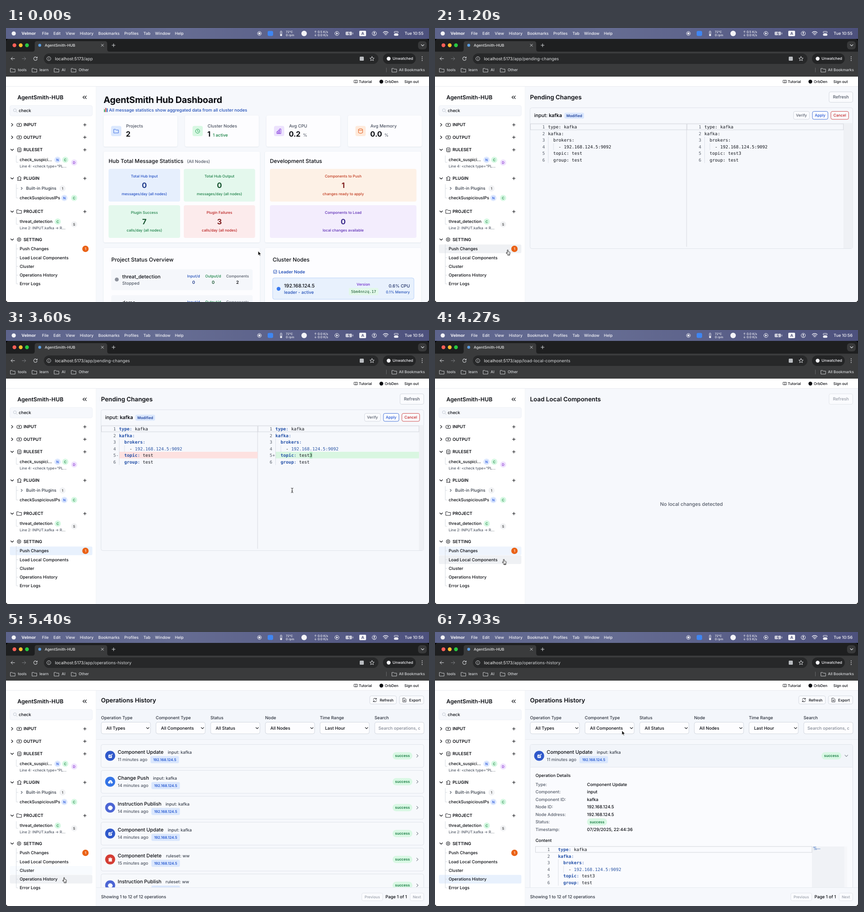
Animation of 928 by 603 pixels, one loop 8 s. Source, as an HTML page:

```html
<!DOCTYPE html>
<html lang="en">
<head>
<meta charset="utf-8">
<title>Dashboard tour</title>
<style>
html, body { margin: 0; width: 100%; height: 100%; overflow: hidden; background: #000; }
svg { display: block; width: 928px; height: 603px; }
text { font-family: Inter, sans-serif; text-rendering: geometricPrecision; white-space: pre; }
.mono { font-family: "DejaVu Sans Mono", monospace; }
.move { animation: move 8s infinite ease-in-out; }
</style>
</head>
<body>
<svg id="stage" viewBox="0 0 928 603"></svg>
<script>
const LOOP = 8000;
const INK = '#090b10', GRAY = '#535a67', BLUE = '#2350b8', EDGE = '#dfe3ea', PAGE = '#f6f8fc';
let css = '', count = 0;
const pct = ms => `${ms / LOOP * 100}%`;

// Shapes. Text is placed by the middle of its capitals.
const text = (x, y, s, size = 9.25, fill = INK, weight = 450, anchor = 'start', cls = '') =>
  `<text x="${x}" y="${y + size * .36}" font-size="${size}" fill="${fill}" font-weight="${weight}" text-anchor="${anchor}" class="${cls}">${s}</text>`;
const mid = (x, y, s, size, fill, weight = 500) => text(x, y, s, size, fill, weight, 'middle');
const box = (x, y, w, h, fill, r = 0, stroke = 'none') =>
  `<rect x="${x}" y="${y}" width="${w}" height="${h}" rx="${r}" fill="${fill}" stroke="${stroke}"/>`;
const dot = (x, y, r, fill, stroke = 'none') => `<circle cx="${x}" cy="${y}" r="${r}" fill="${fill}" stroke="${stroke}"/>`;
const line = (d, color = INK, w = 1, fill = 'none') =>
  `<path d="${d}" stroke="${color}" stroke-width="${w}" fill="${fill}" stroke-linecap="round" stroke-linejoin="round"/>`;
const folder = (x, y, c) => line(`M${x} ${y - 4}h3.5l1.3 1.5h5.2v6.500h-10z`, c, .9);
const chevron = (x, y, down, c = INK, s = 3, w = 1.1) =>
  line(down ? `M${x - s} ${y - s / 2}l${s} ${s}l${s} ${-s}` : `M${x - s / 2} ${y - s}l${s} ${s}l${-s} ${s}`, c, w);
const plus = (x, y, c = INK, s = 3) => line(`M${x - s} ${y}h${2 * s}M${x} ${y - s}v${2 * s}`, c, 1.1);
const badge = (x, y, s, bg, fg) => dot(x, y, 6.8, bg) + mid(x, y, s, 7.5, fg);
const pill = (x, y, w, s, bg, fg, size = 8, h = 15, r = 3) => box(x, y - h / 2, w, h, bg, r) + mid(x + w / 2, y, s, size, fg, 600);

// Timing.
function during(body, ...spans) {
  const name = 'show' + ++count;
  let frames = spans[0][0] > 0 ? '0%{visibility:hidden}' : '';
  for (const [a, b] of spans) frames += `${pct(a)}{visibility:visible}${pct(b)}{visibility:hidden}`;
  css += `@keyframes ${name}{${frames}}`;
  return `<g style="animation:${name} 8s step-end infinite">${body}</g>`;
}
function fade(body, ...stops) {
  const name = 'fade' + ++count;
  const frames = [[0, 0], ...stops, [LOOP, stops.at(-1)[1]]].map(([ms, o]) => `${pct(ms)}{opacity:${o}}`);
  css += `@keyframes ${name}{${frames.join('')}}`;
  return `<g style="animation:${name} 8s linear infinite">${body}</g>`;
}

const DASH = [0, 1000], PENDING = [1000, 4200], LOCAL = [4200, 4880], CLUSTER = [4880, 5270], OPS = [5270, LOOP];
const OPEN = 6750;

function browser() {
  const W = '#f4f4f8', L = '#d5d7da';
  let s = box(0, 0, 928, 24, 'url(#menu)') + box(0, 24, 928, 40, '#1e1f20', 6) + box(0, 52, 928, 55, '#3a3b3c');
  s += dot(17, 12, 4.6, W) + text(34, 11.5, 'Velmor', 9, W, 700);
  [[79, 'File'], [104, 'Edit'], [131, 'View'], [162, 'History'], [202.5, 'Bookmarks'], [259.5, 'Profiles'], [301.5, 'Tab'], [327, 'Window'], [370.5, 'Help']]
    .forEach(([x, name]) => s += text(x, 11.5, name, 8.7, W, 500));
  s += dot(556, 12, 4.2, 'none', W) + dot(556, 12, 2.3, W) + box(574, 6.5, 12, 11, '#3f86f2', 3);
  s += line('M602 13V7.500q1.500 -2 3 0V13', W) + dot(603.5, 15.5, 2.3, W);
  s += text(614, 8.5, '72°C', 6.5, W) + text(614, 16, '0 rpm', 6.5, W) + dot(654, 12, 6, W);
  s += dot(726, 12, 4.5, 'none', W) + line('M724.800 9.800l3.500 2.200l-3.500 2.200z', W, .5, W);
  s += box(745, 8, 14, 8, '#c9cad8', 2) + line('M761 10.500v3', W) + line('M753 8l-2 4.500h3l-2 4', '#454972');
  s += box(775, 6, 15, 12, W, 2) + mid(782.5, 12, 'A', 8.5, '#454972', 600);
  s += dot(808, 12, 4.7, 'none', W) + dot(808, 10.8, 1.7, W) + line('M805.500 15q2.500 -2 5 0', W);
  s += line('M827.500 10q5.500 -4.500 11 0M829.500 12.500q3.500 -2.800 7 0M831.500 14.800q1.500 -1.200 3 0', W, 1.4);
  s += box(851.5, 7.5, 9, 3.6, 'none', 1.8, W) + box(851.5, 13, 9, 3.6, W, 1.8, W);
  const net = (up, down) => text(676, 8.3, `↑ ${up} K/s`, 6.8, W) + text(676, 16, `↓ ${down} K/s`, 6.8, W);
  s += during(net('0.5', '0.0'), [0, 1800]) + during(net('0.5', '0.5'), [1800, 3600], [5700, LOOP]) + during(net('0.0', '0.0'), [3600, 5700]);
  const clock = v => text(874.5, 11.5, `Tue ${v}`, 9, W, 500);
  s += during(clock('10:55'), [0, 1800]) + during(clock('10:56'), [1800, LOOP]);

  s += dot(18.5, 38, 4.2, '#fe5f57') + dot(32.3, 38, 4.2, '#febc2e') + dot(46, 38, 4.2, '#28c840');
  s += line('M58 52q5 0 5 -5V34q0 -5 5 -5H217q5 0 5 5V47q0 5 5 5z', 'none', 0, '#3a3b3c');
  s += dot(74, 38, 3.2, '#5b9de0') + text(85, 38, 'AgentSmith-HUB', 8.2, '#e6e7e8');
  s += line('M209 35.500l5 5M214 35.500l-5 5', L) + plus(236, 38, L, 3.5) + box(904, 29, 19, 18, '#38393a', 6) + chevron(914, 38, true, L);
  s += line('M19 67.500h-8m3.500 -3.500l-3.500 3.500l3.500 3.500', L) + line('M35.500 67.500h8m-3.500 -3.500l3.500 3.500l-3.500 3.500', '#77797c');
  s += line('M67.800 65.500a3.800 3.800 0 1 0 .4 3M68.500 63.500v2.500h-2.500', L, 1.1);
  s += box(83, 56, 734, 23, '#272829', 11.5) + dot(94, 67.5, 4.3, 'none', L) + line('M94 67v2.500M94 65.200v.1', L);
  const url = path => text(107.5, 67.5, `<tspan fill="#f1f1f1">localhost:5173</tspan>/app${path}`, 9.35, '#d6d8da', 400);
  [['', DASH], ['/pending-changes', PENDING], ['/load-local-components', LOCAL], ['/cluster', CLUSTER], ['/operations-history', OPS]]
    .forEach(([path, span]) => s += during(url(path), span));
  s += box(776, 63, 9, 9, '#b9bcc0', 1.5) + line('M803 62.800l1.400 3.200l3.500 .3l-2.700 2.300l.9 3.400l-3.100 -1.900l-3.100 1.900l.9 -3.400l-2.700 -2.300l3.500 -.3z', L);
  s += box(827, 56, 72, 23, '#242526', 11.5) + dot(839.5, 67.5, 4.2, W) + text(848, 67.5, 'Unwatched', 8.3, W, 500);
  [-4, 0, 4].forEach(dy => s += dot(913, 67.5 + dy, 1, L));
  [[10, 'tools'], [57.5, 'learn'], [106, 'AI'], [143.5, 'Other']].forEach(([x, name]) => s += folder(x, 93, L) + text(x + 16, 92.5, name, 8.3, L));
  return s + line('M834.500 88v9', '#66686a') + folder(847, 93, L) + text(862, 92.5, 'All Bookmarks', 8.3, L);
}

function sidebar() {
  let s = box(0, 107, 928, 22, '#fff') + box(0, 129, 198, 474, '#fff') + line('M0 128.500H928', '#e4e6ec', .8) + line('M197.500 129V603', '#eceff4', .7);
  s += line('M767.500 115.500v5.500M764 115h3.500h3.500v5.500h-7z', INK, .8) + text(774, 118, 'Tutorial', 8.05, INK, 500);
  s += dot(823.5, 118, 4.2, INK) + text(831, 118, 'OrbDen', 8.05, INK, 500) + text(874, 118, 'Sign out', 8.05, INK, 500);
  s += text(25, 152.5, 'AgentSmith-HUB', 12.2, INK, 600) + line('M172 149.300l-3.200 3.200l3.200 3.200M176.300 149.300l-3.200 3.200l3.200 3.200', INK, 1.2);
  s += box(8.5, 170.5, 181, 23, PAGE, 4, '#eef1f6') + dot(19.5, 181, 3.2, 'none', '#c3c8d2') + line('M22 183.500l2.500 2.500', '#c3c8d2') + text(28, 182, 'check');
  const wide = y => box(24, y - 3, 10, 6.5, 'none', 1.5, INK) + dot(29, y, 1.3, INK);
  const icons = [wide, wide,
    y => box(25.5, y - 4, 7.5, 8.5, 'none', 1, INK) + line(`M27.500 ${y - .5}h3.500M27.500 ${y + 2}h3.500`, INK, .8),
    y => line(`M25.500 ${y - 2}h2q0 -2.500 2 -2.500t2 2.500h1.500v2.500q-2 0 -2 1.500t2 1v1.500h-7.500v-2q2 0 2 -1.500t-2 -1z`, INK, .9),
    y => folder(24, y, INK),
    y => dot(28.7, y, 4, 'none', INK) + dot(28.7, y, 1.6, 'none', INK)];
  [['INPUT', 213], ['OUTPUT', 240.5], ['RULESET', 268], ['PLUGIN', 331], ['PROJECT', 404], ['SETTING', 465.5]].forEach(([name, y], i) =>
    s += chevron(13.5, y, i > 1) + icons[i](y) + text(38.5, y, name, 9.35, INK, 600) + (i < 5 ? plus(173, y) : ''));

  const row = (y, color) => box(8.5, y - 9.5, 181, 19, color, 3);
  const hover = (y, a, b) => fade(row(y, '#eff1f4'), [a, 0], [a + 100, 1], [b, 1], [b + 130, 0]);
  const active = (y, a, b) => fade(row(y, '#e8f1fd'), [a, 0], [a + 100, 1], ...(b ? [[b, 1], [b + 150, 0]] : []));
  s += active(486, 1720, 4230) + hover(486, 690, 1750) + hover(505.5, 3990, 4560);
  s += active(505.5, 4560, 4890) + hover(524.5, 4560, 5060) + active(524.5, 5060, 5290) + hover(544, 5060, 5640) + active(544, 5640);

  s += line('M22.500 281V295.500h4M22.500 344V374h4M22.500 353h4M22.500 417V432h4M22.500 476V563h4' + [486, 505.5, 524.5, 544].map(y => `M22.500 ${y}h4`).join(''), '#d4d8df', .9);
  const N = (x, y) => badge(x, y, 'N', '#dae6fe', '#1d4ed8'), C = (x, y) => badge(x, y, 'C', '#d5f8e2', '#16803d');
  s += text(30, 290, 'check_suspici...') + N(113, 290) + C(130, 290) + badge(149.5, 296, 'D', '#efe2fd', '#7e22ce') + text(30, 304, 'Line 4: &lt;check type="PL...', 8.05, GRAY);
  s += chevron(34.5, 353, false, GRAY, 2.5) + text(44, 353, 'Built-in Plugins', 9.25, '#333a46') + badge(124, 353, '1', '#f1f2f4', '#333');
  s += text(30, 374, 'checkSuspiciousIPs') + N(128, 374) + C(149.5, 374);
  s += text(30, 426, 'threat_detection') + C(113.5, 426) + badge(149.5, 432, 'S', '#f1f2f4', '#333') + text(30, 440, 'Line 2: INPUT.kafka -> R...', 8.05, GRAY);
  ['Push Changes', 'Load Local Components', 'Cluster', 'Operations History', 'Error Logs'].forEach((name, i) => s += text(30, 486 + i * 19.25, name));
  return s + dot(174.3, 486, 7, '#ea6115') + mid(174.3, 486, '1', 8, '#fff');
}

function dashboard() {
  const card = (x, y, w, h) => `<g filter="url(#soft)">${box(x, y, w, h, '#fdfdff', 4)}</g>`;
  let s = text(214, 158, 'AgentSmith Hub Dashboard', 19.6, INK, 700).replace('<text', '<text letter-spacing="-.25"');
  s += box(214.5, 175.5, 9, 9.5, '#e4eaf1') + box(215, 179, 2, 6, '#38a05a') + box(218, 176, 2, 9, '#d84b4b') + box(221, 177, 2, 8, '#3b76d0') + text(226, 180.5, 'All message statistics show aggregated data from all cluster nodes', 9.5, BLUE);
  const stats = [['Projects', '2', '', '#dbe8fe', '#2f62e0', 9], ['Cluster Nodes', '1', '1 active', '#d8f8e3', '#1fa052', 12], ['Avg CPU', '0.2', '%', '#ece2fd', '#8439dc', 31], ['Avg Memory', '0.0', '%', '#feeadb', '#e2591a', 31]];
  const glyph = [(x, c) => folder(x - 5, 227, c), (x, c) => dot(x, 227, 4.5, 'none', c) + line(`M${x} 224.500v2.800l1.800 .8`, c),
    (x, c) => line(`M${x - 5} 232v-4h3v4zM${x - 2} 232v-7h3v7zM${x + 1} 232v-10h3v10z`, c),
    (x, c) => `<ellipse cx="${x}" cy="223.500" rx="4.500" ry="1.800" fill="none" stroke="${c}"/>` + line(`M${x - 4.5} 223.500v7q4.500 3 9 0v-7`, c)];
  stats.forEach(([name, value, unit, bg, fg, dx], i) => {
    const x = 214 + 178.7 * i;
    s += card(x, 192.5, 162, 68.5) + box(x + 16.5, 215.5, 22.5, 22.5, bg, 4) + glyph[i](x + 27.7, fg);
    s += text(x + 49.5, 216, name, 9.5, '#4a5160', 500) + text(x + 49, 233.5, value, 16, INK, 700) + text(x + 49 + dx, 236, unit, 9.3, i === 1 ? '#168043' : GRAY);
  });
  s += card(214, 272, 343, 200) + card(568, 272, 343, 200) + card(214, 484, 343, 150) + card(568, 484, 343, 150);
  s += text(225, 293, 'Hub Total Message Statistics', 11.85, INK, 500) + text(397, 293.5, '(All Nodes)', 9.5, GRAY) + text(579, 293, 'Development Status', 11.9, INK, 500);
  const tile = (x, y, w, bg, fg, dark, a, n, b) => box(x, y, w, 72, bg, 4) + mid(x + w / 2, y + 16.5, a, 8.1, fg) + mid(x + w / 2, y + 36, n, 16.3, dark, 700) + mid(x + w / 2, y + 55, b, 8.1, fg);
  s += tile(225, 310, 157, '#e6effd', '#2450c4', '#1e3a8a', 'Total Hub Input', 0, 'messages/day (all nodes)');
  s += tile(390, 310, 156.5, '#e4f8ed', '#1d8048', '#14532d', 'Total Hub Output', 0, 'messages/day (all nodes)');
  s += tile(225, 390, 157, '#e4f8ed', '#1d8048', '#14532d', 'Plugin Success', 7, 'calls/day (all nodes)');
  s += tile(390, 390, 156.5, '#fcebec', '#b91f1f', '#7f1d1d', 'Plugin Failures', 3, 'calls/day (all nodes)');
  s += tile(579, 310, 321.5, '#fdf1e6', '#c0391d', '#7f1d1d', 'Components to Push', 1, 'changes ready to apply');
  s += tile(579, 390, 321.5, '#f3edfd', '#5b2bb4', '#3b2a8a', 'Components to Load', 0, 'local changes available');
  s += text(231, 510, 'Project Status Overview', 11.9, INK, 500) + text(585, 510, 'Cluster Nodes', 11.9, INK, 500);
  const project = (y, name, note) => box(231, y, 310, 46, '#f5f7fb', 4) + dot(243, y + 22.5, 4.3, '#8d929c') + text(255, y + 16, name, 10.8, INK, 500) + text(255, y + 31, note, 9.4, GRAY) +
    mid(411.5, y + 15.5, 'Input/d', 8.2, BLUE) + mid(411.5, y + 28.5, 0, 9.4, '#1e3a8a', 600) + mid(454.5, y + 15.5, 'Output/d', 8.2, '#168043') + mid(454.5, y + 28.5, 0, 9.4, '#14532d', 600) +
    mid(508, y + 15.5, 'Components', 8.2, GRAY, 450) + mid(508, y + 28.5, 2, 9.4, INK, 600);
  s += project(531, 'threat_detection', 'Stopped') + project(588, 'demo', 'Stopped');
  s += box(587, 533, 7, 7, 'none', 1, BLUE) + line('M588.500 536.500l1.500 1.500l3 -3', BLUE) + text(598, 537, 'Leader Node', 9.4, BLUE, 600);
  s += box(585, 550, 310, 47, '#e8f1fd', 4, '#b9d2f9') + dot(598, 574, 4.2, '#3a7bf0') + text(610, 567, '192.168.124.5', 10.7, INK, 500) + text(610, 582, 'leader - active', 9.5, BLUE);
  s += mid(784, 564, 'Version', 8.1, '#6d28c9') + box(752, 572, 65, 16, '#e2f8ea', 3) + text(784.5, 580.5, '5bm4nnzq.17', 8.3, '#14532d', 400, 'middle', 'mono');
  return s + text(886, 568, '0.6% CPU', 9.5, '#1e2f66', 500, 'end') + text(886, 581, '0.1% Memory', 8.1, BLUE, 450, 'end');
}

const LINE = 14.5;
function code(x, y, topic, colored, gap, marked = '') {
  const rows = [[0, 'type', ' kafka'], [0, 'kafka', ''], [2, 'brokers', ''], [4, '', '- 192.168.124.5:9092'], [2, 'topic', ' ' + topic], [2, 'group', ' test']];
  const key = k => k && (colored ? `<tspan fill="#2350a8" font-weight="700">${k}</tspan><tspan fill="#2350a8">:</tspan>` : k + ':');
  const value = v => colored ? v.replace(/192.*/, '<tspan fill="#2a55a5">$&</tspan>') : v;
  return line(`M${x + .5} ${y + 22}v57M${x + 12} ${y + 36.500}v14`, '#d6dae1', .8) + rows.map(([indent, k, v], i) =>
    text(x - gap, y + i * LINE, i + 1, 9.3, '#59606c', 400, 'end', 'mono') + (marked && i === 4 ? text(x - 6.5, y + i * LINE, marked, 9.3, '#59606c', 400, 'start', 'mono') : '') +
    text(x + indent * 5.78, y + i * LINE, key(k) + value(v), 9.6, '#15181f', 400, 'start', 'mono')).join('');
}

const title = (s, y = 152) => text(208.5, y, s, 13.3, INK, 600);
const button = (x, y, w, h, s, size, fg, edge = '#d5d9e0') => box(x + .5, y + .5, w - 1, h - 1, '#fafbfe', 3.5, edge) + mid(x + w / 2, y + h / 2, s, size, fg);

function pending() {
  const frame = (right, colored) => box(right, 210, 916.5 - right, 275, '#eff1f5') +
    (colored ? box(248, 268, 304, 14.5, '#fde1e0') + box(591, 268, right - 591, 14.5, '#d9f6e1') + box(666, 268, 6, 14.5, '#b4ebc3') : '') +
    box(209.5, 211, 342.5, 13, 'none', 0, '#d3d6dc') + box(553, 211, right - 553, 13, 'none', 0, '#d3d6dc') +
    code(248, 217.7, 'test', colored, 7, colored && '-') + code(591, 217.7, 'test3', colored, 7, colored && '+');
  let s = title('Pending Changes') + button(864, 140, 53, 24, 'Refresh', 9.5, '#555c69');
  s += box(208.5, 175.5, 708, 310, PAGE, 4, EDGE) + line('M209 209.500H916', '#eceff4', .7) + line('M552 224V481', '#d6d9df');
  s += text(217.5, 192.5, 'input: <tspan font-weight="600">kafka</tspan>', 10.8) + pill(284, 193, 43, 'Modified', '#dae7fd', '#21449c', 8, 13);
  s += button(786, 183, 36, 18.5, 'Verify', 8.4, '#555c69') + button(827.5, 183, 35, 18.5, 'Apply', 8.4, '#2457d6', '#4a76d8') + button(868, 183, 40, 18.5, 'Cancel', 8.4, '#c32222', '#d05050');
  return s + during(frame(896, false), [PENDING[0], 1400]) + during(frame(906, true), [1400, PENDING[1]]);
}

const localPage = () => title('Load Local Components') + button(864, 140, 53, 24, 'Refresh', 9.5, '#9a9fa9', '#e3e6eb') + mid(562.7, 383.5, 'No local changes detected', 10.8, GRAY, 450);

const kinds = {
  'Component Update': ['#3059cb', (x, y) => box(x - 4, y - 3, 7.5, 7.5, '#fff', 1.5) + line(`M${x - .5} ${y + 1}l4.500 -4.500`, '#3059cb', 2.8) + line(`M${x} ${y + .5}l4.500 -4.500`, '#fff', 1.5)],
  'Change Push': ['#3474e6', (x, y) => dot(x - 2.2, y + 1.2, 2.6, '#fff') + dot(x + .4, y - .7, 3.2, '#fff') + dot(x + 3, y + 1.5, 2.3, '#fff') + line(`M${x} ${y + 2.500}v-2.500`, '#3474e6')],
  'Instruction Publish': ['#4c65d4', (x, y) => line(`M${x - 2} ${y - 4}h4l2.500 2.800v3l-2.500 2.700h-4l-2.500 -2.700v-3z`, '#fff', 1, '#fff')],
  'Component Delete': ['#d43d34', (x, y) => line(`M${x - 3} ${y - 1.500}h6v5.500h-6zM${x - 4} ${y - 2.500}h8M${x - 1} ${y - 4}h2`, '#fff', 1.1, '#fff')]
};
function entry(y, kind, subject, age, subjectX, tagX, open) {
  const [color, icon] = kinds[kind];
  return dot(228.5, y + 25.5, 11, color) + icon(228.8, y + 25.8) + text(245, y + 17.5, kind, 10.8, INK, 500) + text(subjectX, y + 18, subject, 9.4, '#3b424e') +
    text(245, y + 34, `${age} minutes ago`, 9.4, GRAY) + pill(tagX, y + 34, 62.5, '192.168.124.5', '#dae7fd', '#2457d0', 7.9, 15.5) +
    pill(848, y + 25.5, 43.5, 'success', '#d9f8e4', '#157a41', 8.1, 16, 8) + chevron(902.5, y + 25.5, open, '#858b96', 3.2);
}

function operations() {
  let s = title('Operations History', 150) + button(797.5, 140, 59.5, 19, '', 8, INK) + button(862.5, 140, 54.5, 19, '', 8, INK);
  s += text(820, 149.8, 'Refresh', 8.2, INK, 500) + text(884.5, 149.8, 'Export', 8.2, INK, 500) + line('M806 148.500a3.600 3.600 0 0 1 6.500 -1m.3 -1.800v2.200h-2.200M812.800 151a3.600 3.600 0 0 1 -6.500 1m-.3 1.800v-2.200h2.200', INK, .9);
  s += line('M871 145.500h4l2.500 2.500v6h-6.500zM874 148.500v3.500m-1.500 -1.500l1.500 1.500l1.500 -1.500', INK, .8);
  s += box(198, 170, 730, 66, '#f3f6fb') + line('M198 170.500H928M198 236.500H928', '#e2e6ec', .8);
  [['Operation Type', 'All Types'], ['Component Type', 'All Components'], ['Status', 'All Status'], ['Node', 'All Nodes'], ['Time Range', 'Last Hour'], ['Search', '']].forEach(([label, value], i) => {
    const x = 208.5 + 120 * i;
    s += text(x, 189, label, 9.4, '#2c323d', 500) + box(x + .5, 198.5, 108, 25.5, '#fdfdff', 4, '#d2d7df');
    s += value ? text(x + 11.5, 211.5, value, 9.5) + chevron(x + 102.5, 211.5, true, INK, 2.8) : `<g clip-path="url(#field)">${text(817, 211.5, 'Search operations, components', 9.4, '#858b96')}</g>`;
  });
  const items = [['Component Update', 'input: kafka', 11, 355, 317], ['Change Push', 'input: kafka', 14, 322.5, 319], ['Instruction Publish', 'input: kafka', 14, 350, 319],
    ['Component Update', 'input: kafka', 14, 355, 319], ['Component Delete', 'ruleset: ww', 15, 351, 319], ['Instruction Publish', 'ruleset: ww', 15, 350, 319]];
  const card = (y, h, edge = EDGE, fill = '#f7f9fc') => box(208.5, y + .5, 708, h, fill, 4, edge);
  const list = items.map((item, i) => card(247 + 57 * i, 50.5) + entry(247 + 57 * i, ...item)).join('');
  const hovered = fade(box(208.5, 247.5, 708, 50.5, 'none', 4, '#b4bac5'), [5950, 0], [6100, 1]);

  let detail = card(247, 400, EDGE, '#fafbfe') + box(209, 248, 707, 49.5, '#f2f5fa', 4) + line('M209 297.500H916', EDGE, .8) + entry(247, ...items[0], true);
  detail += text(220.5, 316, 'Operation Details', 9.35, INK, 500) + text(220.5, 459, 'Content', 9.35, INK, 500);
  [['Type', 'Component Update'], ['Component', 'input'], ['Component ID', 'kafka'], ['Node ID', '192.168.124.5'], ['Node Address', '192.168.124.5'], ['Status', ''], ['Timestamp', '07/29/2025, 22:44:36']]
    .forEach(([name, value], i) => detail += text(220.5, 335.5 + i * 16.45, name + ':', 9.4, GRAY) + text(333.5, 335.5 + i * 16.45, value, 9.45));
  detail += pill(333.5, 418, 44, 'success', '#d9f8e4', '#157a41', 8.1, 15.5, 7.7);
  let editor = box(827, 472, 71, 100, '#f0f2f6') + box(898, 472, 6.5, 100, '#f6f7fa') + box(220.5, 472, 606.5, 13, 'none', 0, '#d3d6dc') + code(270, 478.7, 'test3', true, 18);
  editor += line('M830 472.800h6M830 474.300h4M831.500 475.800h5M834 477.300h11M831.500 478.800h6', '#6f93cf', .9);
  s += `<g clip-path="url(#list)">${during(list + hovered, [OPS[0], OPEN])}${during(detail, [OPEN, LOOP])}${during(editor, [OPEN + 150, LOOP])}</g>`;
  s += line('M198 562.500H928', '#e2e6ec', .8) + text(208.5, 583, 'Showing 1 to 12 of 12 operations', 9.4, '#2c323d');
  return s + button(780, 574, 47, 18, 'Previous', 8.1, '#9a9fa9', '#e3e6eb') + text(832.5, 583, 'Page 1 of 1', 9.4) + button(886, 574, 31, 18, 'Next', 8.1, '#9a9fa9', '#e3e6eb');
}

function pointer() {
  const path = [[0, 553, 491], [70, 553, 491], [750, 157, 488.5], [1700, 157, 488.5], [2250, 703, 294], [2700, 703, 294], [3100, 715, 300], [3450, 700, 330], [4050, 148.5, 504.5],
    [4400, 148.5, 504.5], [4750, 134, 522], [4950, 134, 522], [5200, 125, 540.5], [5500, 125, 540.5], [6350, 394, 279.5], [6950, 394, 279.5], [7500, 410, 217], [LOOP, 410, 217]];
  css += `@keyframes move{${path.map(([ms, x, y]) => `${pct(ms)}{transform:translate(${x}px,${y}px)}`).join('')}}`;
  const arrow = line('M0 0V9.500L2.200 7.500L3.800 11L5.400 10.300L3.900 7H6.800Z', '#fff', .8, '#111');
  const hand = line('M1.500 7V1Q1.500 -.3 2.500 -.3T3.500 1V4L7 4.800Q8 5.200 7.800 6.500L7 10V11.500H2.500V10L-1 6.800Q-1 5 .5 6Z', '#111', .9, '#fff') + line('M4 8v2M5.500 8v2', '#111', .6);
  const beam = line('M-2 -5Q0 -5 0 -3.500Q0 -5 2 -5M0 -3.500V3.500M-2 5Q0 5 0 3.500Q0 5 2 5M-1 1.500H1', '#222', 1);
  return `<g class="move">${during(arrow, [0, 620], [1860, 2000], [3800, 3900], [5720, 5900], [7200, LOOP])}${during(hand, [620, 1860], [3900, 5720], [5900, 7200])}${during(beam, [2000, 3800])}</g>`;
}

const defs = `<defs><filter id="soft" x="-5%" y="-10%" width="110%" height="120%"><feDropShadow dx="0" dy=".7" stdDeviation="1.200" flood-color="#3c4a68" flood-opacity=".12"/></filter>
<linearGradient id="menu"><stop stop-color="#5d648c"/><stop offset=".4" stop-color="#666d93"/><stop offset="1" stop-color="#4d517d"/></linearGradient>
<clipPath id="list"><rect x="198" y="237" width="730" height="325"/></clipPath><clipPath id="field"><rect x="810" y="199" width="98.500" height="25"/></clipPath>
<clipPath id="window"><path d="M0 0H928V597Q928 603 922 603H6Q0 603 0 597Z"/></clipPath></defs>`;
const pages = [[dashboard, DASH], [pending, PENDING], [localPage, LOCAL], [() => title('Cluster'), CLUSTER]].map(([page, span]) => during(page(), span)).join('');
// The last page holds its own timed parts, so it is shown through opacity.
const last = fade(operations(), [OPS[0] - .01, 0], [OPS[0], 1]);
const scene = `<g clip-path="url(#window)">${box(0, 107, 928, 496, PAGE)}${pages}${last}${browser()}${sidebar()}</g>${pointer()}`;
document.getElementById('stage').innerHTML = defs + `<style>${css}</style>` + scene;
</script>
</body>
</html>
```
